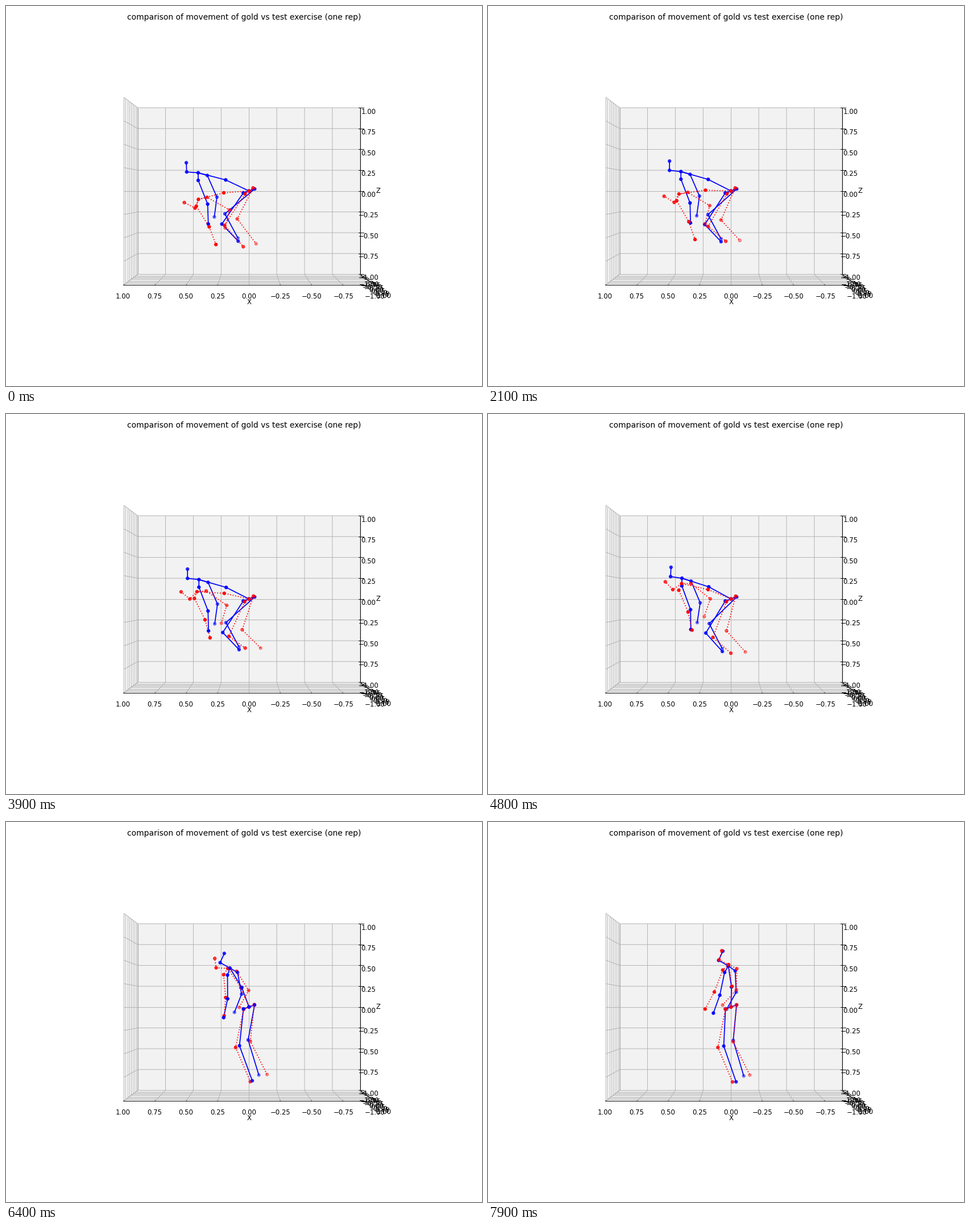
A matplotlib script that plays this animation: 837 by 669 pixels, repeating every 8 s.

```python
import numpy as np
import matplotlib.pyplot as plt
from matplotlib.animation import FuncAnimation
from matplotlib.colors import to_rgb

W, H = 837, 669
FRAMES, STEP_MS = 80, 100
ROOT = np.array([427.3, 325.6])
STRETCH = 4 / 3  # the room is 4:4:3, so x is wider than z

# joint n + 1 hangs from its parent by bone n: (parent, group, length)
BONES = [(0, "trunk", 36.3), (1, "trunk", 38.5), (2, "head", 16), (3, "head", 17.2),
         (2, "arm", 13), (5, "arm", 42.3), (6, "arm", 34),
         (2, "trunk", 13), (8, "arm", 39), (9, "arm", 34),
         (0, "trunk", 8.3), (11, "leg", 66.5), (12, "near shin", 65),
         (0, "trunk", 8.3), (14, "leg", 63.5), (15, "far shin", 64)]

# joints of each limb and the opacity its tip fades to
LIMBS = [((0, 1, 2, 3, 4), 0.77), ((2, 5, 6, 7), 0.92), ((2, 8, 9, 10), 0.45),
         ((0, 11, 12, 13), 0.75), ((0, 14, 15, 16), 0.4)]


class Curve:
    """Monotone cubic through (time, value) points."""

    def __init__(self, *points):
        self.t, self.v = np.array(points, float).T
        d = np.diff(self.v) / np.diff(self.t)
        inner = [2 * a * b / (a + b) if a * b > 0 else 0 for a, b in zip(d, d[1:])]
        self.m = [d[0], *inner, d[-1]]

    def at(self, t):
        i = int(np.clip(np.searchsorted(self.t, t, "right") - 1, 0, len(self.t) - 2))
        h = self.t[i + 1] - self.t[i]
        s = (t - self.t[i]) / h
        ease = s * s * (3 - 2 * s)
        v = self.v[i] + (self.v[i + 1] - self.v[i]) * ease
        v += h * s * (1 - s) * ((1 - s) * self.m[i] - s * self.m[i + 1])
        return max(v, 0)


fig = plt.figure(figsize=(10.009, 8), dpi=83.625, facecolor="white")
fig.suptitle("comparison of movement of gold vs test exercise (one rep)",
             fontsize=11.92, y=0.981)

pad = 10.8 / 72 / 8
room = fig.add_axes([0, pad, 1, 1 - 2 * pad], projection="3d")
room.set(xlim=(-1, 1), ylim=(-1, 1), zlim=(-1, 1),
         xlabel="X", ylabel="Y", zlabel="Z")
room.view_init(elev=0, azim=90)

stage = fig.add_axes([0, 0, 1, 1])
stage.set(xlim=(0, W), ylim=(H, 0))
stage.axis("off")


class Performer:
    """Jointed body between a crouch and a stand.

    Angles lean from straight up towards +X. Each group has
    (easing power, length scale crouched, length scale standing).
    """

    def __init__(self, color, style, bend, tuck, crouch, stand, groups):
        self.bend, self.tuck = bend, tuck
        self.crouch, self.stand = np.radians(crouch), np.radians(stand)
        self.groups = groups
        self.lines = [stage.plot([], [], color=color, ls=style, lw=1.5, zorder=2)[0]
                      for _ in LIMBS]
        alpha = np.ones(len(BONES) + 1)
        for joints, tip in LIMBS:
            fade = np.linspace(alpha[joints[0]], tip, len(joints))
            alpha[list(joints)] = fade
        rgba = [(*to_rgb(color), a) for a in alpha]
        self.dots = stage.scatter(*self.pose(0).T, s=20, c=rgba, zorder=4)

    def pose(self, t):
        bend, tuck = self.bend.at(t), self.tuck.at(t)
        joints = [ROOT]
        for (parent, group, length), low, high in zip(BONES, self.crouch, self.stand):
            power, small, full = self.groups[group]
            k = (tuck if "shin" in group else bend) ** power
            angle = high + (low - high) * k
            reach = length * (full + (small - full) * k)
            step = reach * np.array([-STRETCH * np.sin(angle), -np.cos(angle)])
            joints.append(joints[parent] + step)
        return np.array(joints)

    def move(self, t):
        p = self.pose(t)
        for line, (joints, _) in zip(self.lines, LIMBS):
            line.set_data(*p[list(joints)].T)
        self.dots.set_offsets(p)
        return [*self.lines, self.dots]


gold = Performer(
    "blue", "-",
    bend=Curve((0, 1.03), (1.8, 1), (4.5, 1), (5.6, 0.69), (6.4, 0.29), (7.9, 0)),
    tuck=Curve((0, 1), (4.5, 1), (5.6, 0.42), (6.4, 0.04), (7.9, 0)),
    crouch=[56, 69, 82, 0, 180, 196, 181, 248, 198, 174,
            115, 154, 215.5, 295, 140, 202],
    stand=[-1, 6.4, 53, -19, 157, 171, 165, 226, 182, 157.5,
           115, 178, 194.5, 295, 176, 192.5],
    groups={"trunk": (1, 1, 0.97), "head": (3, 0.95, 1), "arm": (0.8, 1.03, 0.96),
            "leg": (1.8, 0.93, 0.985), "near shin": (1, 0.57, 1),
            "far shin": (1, 0.72, 1)})

test = Performer(
    "red", ":",
    bend=Curve((0, 1), (1, 0.975), (2.1, 0.92), (3.9, 0.77), (5.4, 0.53),
               (5.6, 0.44), (6.4, 0.2), (7.9, 0)),
    tuck=Curve((0, 0.55), (2.1, 0.85), (3.9, 1), (4.5, 0.92), (5.4, 0.35),
               (5.6, 0.02), (7.9, 0)),
    crouch=[95.6, 109, 164, 55.6, 167, 205, 196, 288, 233, 170,
            135, 154, 226, 315, 159, 217],
    stand=[-2, 6.6, 56, -12.7, 141, 164, 158, 236, 179, 146,
           117, 171.7, 197.5, 297, 176, 200.5],
    groups={"trunk": (1, 0.92, 1), "head": (0.8, 1, 0.95), "arm": (0.45, 0.95, 0.95),
            "leg": (2, 0.92, 1.025), "near shin": (1, 0.46, 0.98),
            "far shin": (1, 0.63, 0.98)})


def update(i):
    t = i * STEP_MS / 1000
    # gold passes in front for a while as both straighten up
    gold.dots.set_zorder(5 if 6 <= t < 7.2 else 3)
    return gold.move(t) + test.move(t)


anim = FuncAnimation(fig, update, frames=FRAMES, interval=STEP_MS,
                     init_func=lambda: update(0), repeat=True, repeat_delay=0)
plt.show()
```
